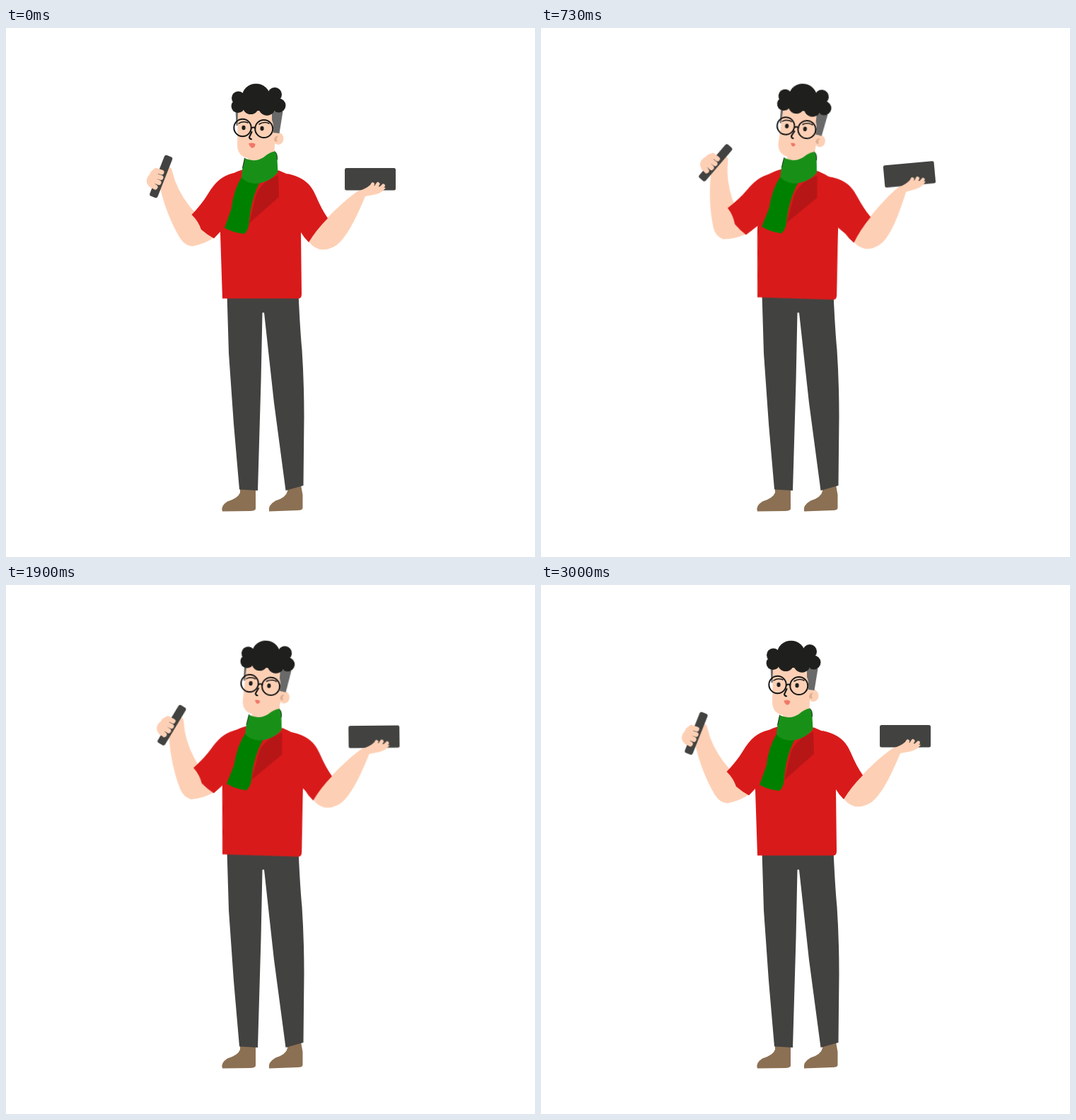
An HTML page without scripts that plays this animation: 748x748 px, repeating every 3030 ms.

```html
<!DOCTYPE html>
<html lang="en">
<head>
<meta charset="utf-8">
<title>Talking man</title>
<style>
  html, body { margin: 0; width: 100%; height: 100%; overflow: hidden; background: #fff; }
  svg { display: block; width: 100vw; height: 100vh; }

  .skin { fill: #fdd0b5; }
  .red { fill: #d91a1a; }
  .dark { fill: #424240; }
  .hair { fill: #1f1f1d; }
  .shoe { fill: #8c7053; }
  .line { fill: none; stroke: #141414; stroke-linecap: round; }
  .fingers { fill: none; stroke: #fdd0b5; stroke-linecap: round; }

  .move { animation: 3.03s linear infinite; }
  #body { transform-origin: 362px 382px; animation-name: sway; }
  #head { transform-origin: 358px 185px; animation-name: tilt; }
  #armL { transform-origin: 313px 240px; animation-name: upper; }
  #foreL { transform-origin: 264px 298px; animation-name: fore; }
  #armR { transform-origin: 419px 205px; animation-name: lift; }
  #mouth { transform-origin: 347.5px 166px; animation-name: talk; }

  @keyframes sway {
    0% { transform: rotate(0deg); }
    10.9% { transform: rotate(.9deg); animation-timing-function: ease-out; }
    24.1%, 56% { transform: rotate(1.8deg); animation-timing-function: ease-in; }
    73.6% { transform: rotate(1.44deg); }
    86.8% { transform: rotate(.6deg); animation-timing-function: ease-out; }
    100% { transform: rotate(0deg); }
  }
  @keyframes tilt {
    0% { transform: rotate(0deg); }
    10.9% { transform: rotate(2.6deg); animation-timing-function: ease-out; }
    24.1%, 54% { transform: rotate(5.1deg); animation-timing-function: ease-in-out; }
    73.6% { transform: rotate(1.3deg); animation-timing-function: ease-out; }
    86.8% { transform: rotate(.3deg); }
    100% { transform: rotate(0deg); }
  }
  @keyframes upper {
    0% { transform: rotate(0deg); }
    10.9% { transform: rotate(3.6deg); animation-timing-function: ease-out; }
    24.1%, 34% { transform: rotate(7deg); }
    48.5% { transform: rotate(4.6deg); }
    73.6% { transform: rotate(1.5deg); }
    86.8% { transform: rotate(.8deg); }
    100% { transform: rotate(0deg); }
  }
  @keyframes fore {
    0% { transform: rotate(0deg); }
    10.9% { transform: rotate(5.7deg); animation-timing-function: ease-out; }
    24.1%, 34% { transform: rotate(10.4deg); }
    48.5% { transform: rotate(7.4deg); }
    73.6% { transform: rotate(3.3deg); }
    86.8% { transform: rotate(2deg); }
    100% { transform: rotate(0deg); }
  }
  @keyframes lift {
    0% { transform: rotate(0deg); }
    10.9% { transform: rotate(-5.4deg); animation-timing-function: ease-out; }
    24.1%, 33% { transform: rotate(-7deg); }
    48.5% { transform: rotate(-3.8deg); }
    73.6% { transform: rotate(-1.2deg); }
    86.8%, 100% { transform: rotate(0deg); }
  }
  @keyframes talk {
    0%, 100% { transform: scale(1); }
    10.9% { transform: scale(.6); }
    24.1% { transform: scale(.7); }
    48.5% { transform: scale(.48); }
    73.6% { transform: scale(1); }
    86.8% { transform: scale(.28); }
  }
</style>
</head>
<body>
<svg viewBox="0 0 748 748">
  <!-- legs -->
  <path class="shoe" d="M331 651L353 653V680Q352 683 345 683L306 683.500Q303 676 313 669.500Q328 665 331 657Z"/>
  <path class="shoe" d="M398 650L417 646L419.500 660V679Q419 682 413 682L372 683.500Q370 675 381 668.500Q396 664 398 655Z"/>
  <path class="dark" d="M312.500 376H413.500Q416 430 418.500 455Q421.500 500 421.500 550L420.500 647L395.500 654L379 530L365 402.500H362.500L360.500 500L356 654L330 652.500L322 560L315 460Z"/>

  <g id="body" class="move">
    <g id="armR" class="move">
      <path class="skin" d="M428 302Q436 313 448 313.500Q463 313 473 302C486 288 497 264 508 238L518 236Q531 234 537 226.500L534 223L514 226Q503 229 497 231Q478 244 453 270L440 280Z"/>
      <rect class="dark" x="479" y="198" width="72" height="31.500" rx="2.500"/>
      <path class="skin" d="M497 231Q508 228 515 222L537 226Q531 234 518 236L504 238Z"/>
      <path class="fingers" stroke-width="5" d="M513 230L518.500 221M519 231L526 220.500M525 231L533.500 223"/>
      <path class="red" d="M398 206C420 211 431 220 438 237Q446 256 455 269Q439 285 428 303Q421 296 417 289L390 262V214Z"/>
    </g>

    <g id="armL" class="move">
      <path class="skin" d="M262 308.500Q279 307 296 295L282 268L262 268L250 290Z"/>
      <g id="foreL" class="move">
        <path class="skin" d="M219 230C224 252 234 277 246 297Q253 308.500 265 308.500L280 298L268 262Q248 240 239 216L234 199Q230 194 226 199L212 222Z"/>
        <rect class="dark" x="213.200" y="179" width="12" height="62" rx="3" transform="rotate(21.400 219 210)"/>
        <path class="skin" d="M214 198Q205 200 203 207Q198 212 199 219Q202 226 208 227L215 208Z"/>
        <path class="fingers" stroke-width="7" d="M212 201.500L220 204M208 208L219 211.500M206 214L216 218.500M205 221L211 225"/>
      </g>
      <path class="red" d="M322 205C305 209 296 218 286 234Q277 249 262.500 264Q272 273 276 285Q284 292 294 297.500L304 287L328 262V214Z"/>
    </g>

    <path class="red" d="M334 200.500Q312 207 303 222V290L306 382.500H414Q418 382 418 376L417 290V222Q406 209 386 201.500Z"/>
    <path fill="#b71616" d="M385 208Q359 218 353 238L344 276L386 239Z"/>

    <g id="head" class="move">
      <path fill="#696969" d="M324.500 114H330V138H325.500Z"/>
      <path class="skin" d="M328 114H378L381 150L378 196H342V184Q327 181 327 165Z"/>
      <ellipse class="skin" cx="385" cy="156.500" rx="7.500" ry="8.500"/>
      <path d="M379 158Q380 152 385 153Q381 156 384 160Q380 162 379 158Z" fill="#dfae91"/>
      <path fill="#696969" d="M376 118H391.500L386.500 149L378 148Q379 137 376 130Z"/>
      <g class="hair">
        <circle cx="328.500" cy="99" r="9.500"/>
        <circle cx="328" cy="110.500" r="9.500"/>
        <ellipse cx="353.500" cy="96.500" rx="19.500" ry="17.800"/>
        <circle cx="380" cy="94" r="10"/>
        <circle cx="385.500" cy="109.500" r="10"/>
        <circle cx="346" cy="110.500" r="11.500"/>
        <circle cx="369" cy="112" r="11.800"/>
        <ellipse cx="357" cy="103" rx="32" ry="14"/>
      </g>
      <g class="line" stroke-width="2">
        <circle cx="334.500" cy="141" r="12.200"/>
        <circle cx="364.700" cy="142.500" r="12.500"/>
        <path d="M347 141.500Q350 139.500 352.500 141.500M347.500 147L344 154.500Q344.500 157 347 157.200"/>
        <path stroke-width="1.500" d="M329 135Q335 131 342 134M358 136Q365 131.500 372 135"/>
      </g>
      <ellipse class="hair" cx="336" cy="141" rx="2.600" ry="3.300"/>
      <ellipse class="hair" cx="362" cy="142" rx="2.600" ry="3.300"/>
      <path id="mouth" class="move" fill="#f27667" d="M343 163.500Q348 161.500 352.500 164Q352.500 169.500 347.500 169.800Q344.500 168 343 163.500Z"/>
    </g>

    <path fill="#008000" d="M333 211Q322 228 318.500 256L309 282.500Q322 290 337 291Q342 287 343.500 278Q346 242 359 218Z"/>
    <path fill="#189018" d="M337.500 184Q351 191 364 183Q373 175 380 174.500Q384 177 383.500 186L384.500 204Q372 219 352 220Q337 218 333 211Q334 196 337.500 184Z"/>
    <path class="line" stroke-width=".8" d="M334.500 198L337.500 184M380 174.500Q384 177 383.500 186"/>
  </g>
</svg>
</body>
</html>
```
